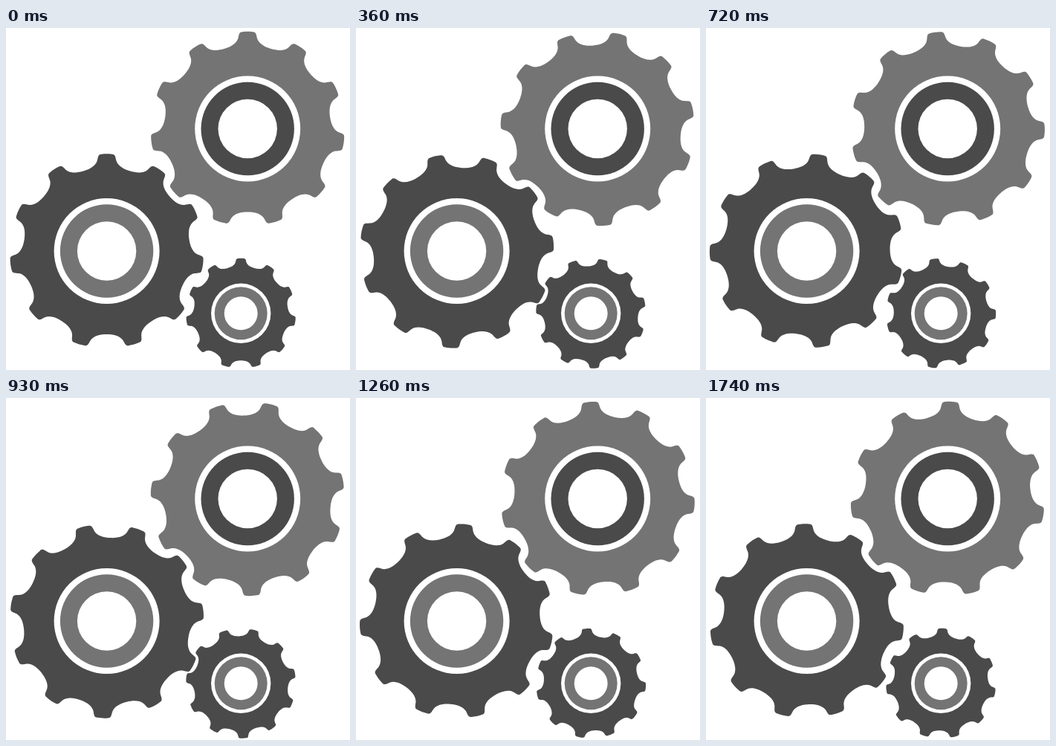
Write an HTML page that moves like this. It is 463 px wide and 460 px high and loops after 1.77 s.

```html
<!DOCTYPE html>
<html>
<head>
<meta charset="utf-8">
<title>Turning gears</title>
<style>
html, body { margin: 0; width: 100%; height: 100%; overflow: hidden; background: #fff; }
svg { display: block; }
</style>
</head>
<body>
<svg id="stage" width="463" height="460" viewBox="0 0 463 460"></svg>
<script>
const DARK = '#4a4a4a', LIGHT = '#747474';
const TEETH = 11, PITCH = 360 / TEETH;
const LOOP = 1770, STEP = 30, TEETH_PER_LOOP = 3;

// One tooth pointing up, from valley to valley: x, height above the centre.
const HALF = [[-31.5, 107.5], [-24, 109.7], [-15.5, 113.8], [-13, 121],
              [-11.5, 126], [-12, 130.2], [-7, 130.3]];
const TOOTH = [...HALF, [-3, 130.9], [3, 130.9],
               ...HALF.map(([x, h]) => [-x, h]).reverse()];

function gearPath() {
  let d = '';
  for (let i = 0; i < TEETH; i++) {
    const a = i * PITCH * Math.PI / 180, c = Math.cos(a), s = Math.sin(a);
    const pts = TOOTH.map(([x, h]) =>
      (x * c + h * s).toFixed(2) + ' ' + (x * s - h * c).toFixed(2));
    d += (i ? 'L' : 'M') + pts[0] + 'C' + pts.slice(1).join(' ');
  }
  return d + 'Z';
}

const stage = document.getElementById('stage');
const outline = gearPath();

function addGear(x, y, scale, body, ring, dir) {
  const disc = (r, fill) => `<circle r="${r}" fill="${fill}"/>`;
  stage.insertAdjacentHTML('beforeend',
    `<g transform="translate(${x} ${y}) scale(${scale})">
      <path d="${outline}" fill="${body}"/>
      ${disc(71, '#fff')}${disc(62.7, ring)}${disc(39.7, '#fff')}
    </g>`);
  return { wheel: stage.lastElementChild.querySelector('path'), dir };
}

const gears = [
  addGear(325.2, 135.5, 1, LIGHT, DARK, -1),
  addGear(135.6, 300, 1, DARK, LIGHT, 1),
  addGear(316.2, 383.8, 0.566, DARK, LIGHT, -1)
];

const start = performance.now();
function draw() {
  const t = (performance.now() - start) % LOOP;
  const turn = Math.floor(t / STEP) * STEP / LOOP * TEETH_PER_LOOP * PITCH;
  for (const { wheel, dir } of gears) {
    wheel.setAttribute('transform', `rotate(${dir * turn})`);
  }
  requestAnimationFrame(draw);
}
draw();
</script>
</body>
</html>
```
